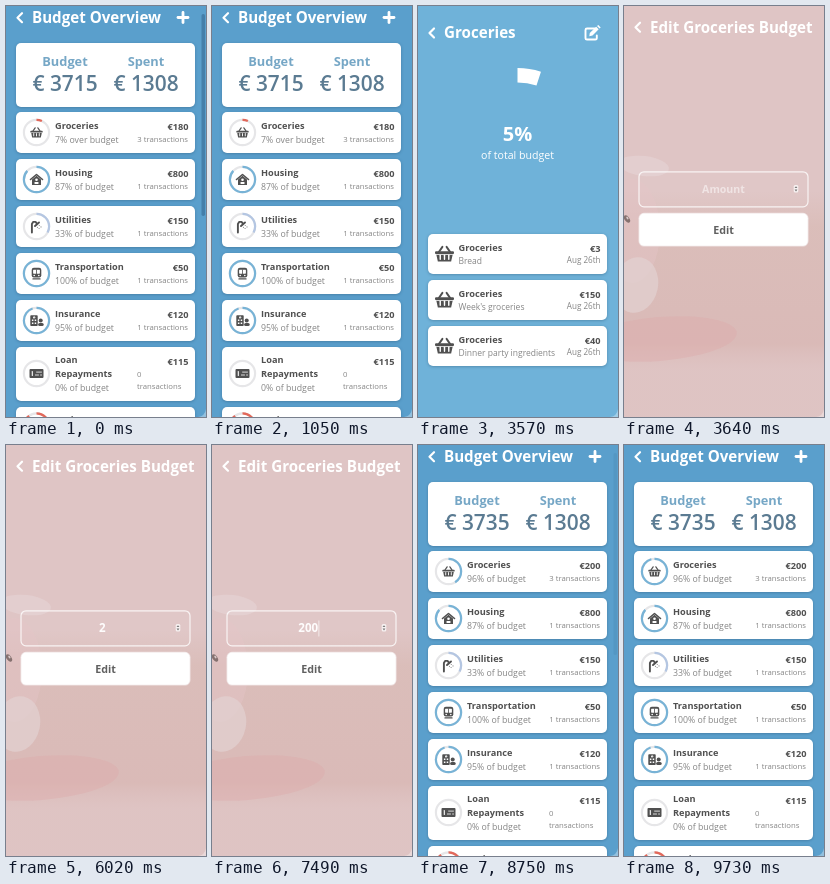
Recreate the animation shown at these times as an HTML page with a canvas. Size 200 px wide and 411 px high, loop 9.8 s.

```html
<!DOCTYPE html>
<html lang="en">
<head>
<meta charset="utf-8">
<title>Budget Overview</title>
<style>
  html, body { margin: 0; width: 100%; height: 100%; overflow: hidden; background: #5a9fcc; }
  canvas { display: block; width: 200px; height: 411px; }
</style>
</head>
<body>
<canvas id="stage"></canvas>
<script>
const W = 200, H = 411, LOOP = 9800;
const DARK = '#505050', GREY = '#858585', BLUE = '#78b3d6', RED = '#e2685a';
const FONT = '"Open Sans", "Noto Sans", sans-serif';

const canvas = document.getElementById('stage');
const ctx = canvas.getContext('2d');
const dpr = window.devicePixelRatio || 1;
canvas.width = W * dpr;
canvas.height = H * dpr;

// ---------- helpers ----------
function text(str, x, y, size, weight, color, align = 'left') {
  ctx.font = `${weight} ${size}px ${FONT}`;
  ctx.fillStyle = color;
  ctx.textAlign = align;
  ctx.fillText(str, x, y);
}

function box(x, y, w, h, r, fill) {
  ctx.beginPath();
  ctx.roundRect(x, y, w, h, r);
  ctx.fillStyle = fill;
  ctx.fill();
}

function line(points, width, color) {
  ctx.beginPath();
  points.forEach(([x, y]) => ctx.lineTo(x, y));
  ctx.lineWidth = width;
  ctx.strokeStyle = color;
  ctx.lineCap = ctx.lineJoin = 'round';
  ctx.stroke();
}

function shape(points, fill) {
  ctx.beginPath();
  points.forEach(([x, y]) => ctx.lineTo(x, y));
  ctx.closePath();
  ctx.fillStyle = fill;
  ctx.fill();
}

function oval(x, y, rx, ry, fill, turn = 0) {
  ctx.beginPath();
  ctx.ellipse(x, y, rx, ry, turn, 0, Math.PI * 2);
  ctx.fillStyle = fill;
  ctx.fill();
}

function arc(x, y, r, part, width, color) {
  if (part <= 0) return;
  ctx.beginPath();
  ctx.arc(x, y, r, -Math.PI / 2, (part * 2 - 0.5) * Math.PI);
  ctx.lineWidth = width;
  ctx.lineCap = 'butt';
  ctx.strokeStyle = color;
  ctx.stroke();
}

function card(y, h) {
  ctx.save();
  ctx.shadowColor = 'rgba(25, 60, 90, 0.35)';
  ctx.shadowBlur = 3 * dpr;
  ctx.shadowOffsetY = 0.8 * dpr;
  box(10, y, 179, h, 5, '#fff');
  ctx.restore();
}

function at(x, y, scale, draw) {
  ctx.save();
  ctx.translate(x, y);
  ctx.scale(scale, scale);
  draw();
  ctx.restore();
}

function header(title, y) {
  line([[16, y - 4.5], [11.5, y], [16, y + 4.5]], 2.2, '#fff');
  text(title, 26, y + 5.4, 15.15, 700, '#fff');
}

function corner() {
  ctx.beginPath();
  ctx.moveTo(W, H - 8);
  ctx.quadraticCurveTo(W - 1, H - 1, W - 8, H);
  ctx.lineTo(W, H);
  ctx.fillStyle = 'rgba(255, 255, 255, 0.35)';
  ctx.fill();
}

const clamp = p => Math.min(1, Math.max(0, p));
const ease = p => p * p * (3 - 2 * p);
const progress = (t, from, length) => clamp((t - from) / length);

// ---------- icons, centred on 0,0 ----------
function basket() {
  line([[-6, -2], [-2.2, -7.5]], 2, DARK);
  line([[6, -2], [2.2, -7.5]], 2, DARK);
  box(-10, -2.8, 20, 3, 1.2, DARK);
  shape([[-8.5, 1], [8.5, 1], [7, 8], [-7, 8]], DARK);
  for (const x of [-4.5, 0, 4.5]) line([[x, 1.4], [x, 5.5]], 1.5, '#fff');
}

function house() {
  line([[-6, 0], [0, -5], [6, 0]], 1.6, DARK);
  shape([[-4.5, 0], [0, -3.8], [4.5, 0], [4.5, 5.5], [-4.5, 5.5]], DARK);
  oval(0, 0.3, 1.3, 1.3, '#fff');
  box(-2.2, 2.4, 4.4, 2, 1, '#fff');
}

function shower() {
  line([[-4.6, 6], [-4.6, -2.6], [-3.4, -4.6], [-1, -4.6], [0, -3.5]], 1.9, DARK);
  line([[-1.5, -0.5], [2.5, -4]], 1.9, DARK);
  for (const [x, y] of [[1, 0.8], [2.8, -1], [2.6, 2], [4.5, 0.4]])
    oval(x, y, 0.6, 0.6, '#888');
}

function train() {
  box(-4.8, -5.8, 9.6, 9.8, 2.2, DARK);
  box(-3.4, -3.8, 6.8, 4, 0.6, '#fff');
  line([[0, -3.8], [0, 0.2]], 0.8, DARK);
  oval(-2.3, 2, 0.8, 0.8, '#fff');
  oval(2.3, 2, 0.8, 0.8, '#fff');
  line([[-3.6, 5.4], [3.6, 5.4]], 1.1, DARK);
}

function clinic() {
  box(-6.2, -5.3, 7.4, 10.8, 0.8, DARK);
  for (const y of [-1, 2]) for (const x of [-4.6, -1.8]) box(x, y, 1.5, 1.5, 0, '#fff');
  line([[-2.5, -4.1], [-2.5, -2.1]], 0.8, '#fff');
  line([[-3.5, -3.1], [-1.5, -3.1]], 0.8, '#fff');
  oval(4.2, 0, 2, 2, DARK);
  box(1.6, 2.5, 5.6, 3, 1.5, DARK);
}

function check() {
  box(-7, -4.5, 14, 9, 0.9, DARK);
  line([[-4.2, -2], [-4.2, 2]], 1.1, '#fff');
  line([[-1.2, 1.5], [2, 1.5]], 0.8, '#fff');
  line([[0, -1.4], [5, -1.4]], 0.8, '#fff');
  line([[4, 1.5], [5, 1.5]], 0.8, '#fff');
}

function pencil() {
  ctx.beginPath();
  ctx.moveTo(3, -4.5);
  ctx.lineTo(-5.5, -4.5);
  ctx.quadraticCurveTo(-7, -4.5, -7, -3);
  ctx.lineTo(-7, 5.2);
  ctx.quadraticCurveTo(-7, 6.5, -5.5, 6.5);
  ctx.lineTo(2.8, 6.5);
  ctx.quadraticCurveTo(4.3, 6.5, 4.3, 5.2);
  ctx.lineTo(4.3, 2.5);
  ctx.lineWidth = 1.9;
  ctx.strokeStyle = '#fff';
  ctx.stroke();
  shape([[-3.2, 3.2], [-2.7, 0], [3.7, -6.2], [6.2, -3.7], [0, 2.6]], '#fff');
  shape([[4.5, -7], [5.8, -8], [8.2, -5.6], [7.1, -4.5]], '#fff');
}

// ---------- screens ----------
const items = [
  ['Housing', '87% of budget', '€800', 0.87, BLUE, house],
  ['Utilities', '33% of budget', '€150', 0.33, '#b4c6e2', shower],
  ['Transportation', '100% of budget', '€50', 1, BLUE, train],
  ['Insurance', '95% of budget', '€120', 0.95, BLUE, clinic]
];

function ring(y, part, color, icon, scale = 1) {
  arc(30.5, y, 12.6, 1, 2.2, '#e6e6e8');
  arc(30.5, y, 12.6, part, 2.2, color);
  if (icon) at(30.5, y, scale, icon);
}

function item(y, [name, sub, price, part, color, icon, scale], count = 1) {
  card(y, 41);
  ring(y + 20.5, part, color, icon, scale);
  text(name, 49, y + 17.1, 9.2, 700, DARK);
  text(sub, 49, y + 30.8, 8.75, 400, GREY);
  text(price, 182.5, y + 18.3, 9.2, 700, DARK, 'right');
  text(count + ' transactions', 182, y + 30.1, 7.75, 400, GREY, 'right');
}

function overview(saved, grow, bar) {
  ctx.fillStyle = '#5a9fcc';
  ctx.fillRect(0, 0, W, H);
  header('Budget Overview', 11.7);
  line([[177, 6.5], [177, 16.5]], 2.8, '#fff');
  line([[172, 11.5], [182, 11.5]], 2.8, '#fff');

  card(37, 64);
  text('Budget', 59, 59.7, 12.8, 700, '#76a7c6', 'center');
  text('Spent', 140, 59.7, 12.8, 700, '#76a7c6', 'center');
  text(saved ? '€ 3735' : '€ 3715', 59, 85.2, 20.9, 600, '#5b7b92', 'center');
  text('€ 1308', 140, 85.2, 20.9, 600, '#5b7b92', 'center');

  const food = saved
    ? ['Groceries', '96% of budget', '€200', 0.07 + 0.89 * grow, BLUE, basket, 0.62]
    : ['Groceries', '7% over budget', '€180', 0.07, RED, basket, 0.62];
  item(106, food, 3);
  items.forEach((it, i) => item(153 + 47 * i, it));

  card(341, 54);
  ring(367.5, 0, BLUE, check);
  text('Loan', 49, 357.4, 9.2, 700, DARK);
  text('Repayments', 49, 371.4, 9.2, 700, DARK);
  text('0% of budget', 49, 384.8, 8.75, 400, GREY);
  text('€115', 182.5, 359.4, 9.2, 700, DARK, 'right');
  text('0', 131, 371, 7.75, 400, GREY);
  text('transactions', 131, 382.6, 7.75, 400, GREY);

  card(401, 41);
  ring(420, 0.9, RED);
  text('Savings', 49, 417.3, 9.2, 700, DARK);

  box(195.5, 8, 3.5, 202, 1.75, `rgba(45, 95, 135, ${0.5 * bar})`);
  corner();
}

function groceries() {
  ctx.fillStyle = '#6fb2d9';
  ctx.fillRect(0, 0, W, H);
  header('Groceries', 27);
  at(174.5, 27, 1, pencil);
  arc(99.5, 138, 68.7, 0.05, 14.5, '#fff');
  text('5%', 99.5, 134.5, 20, 700, '#fff', 'center');
  text('of total budget', 99.5, 153, 10.6, 400, '#fff', 'center');

  [['Bread', '€3'], ["Week's groceries", '€150'], ['Dinner party ingredients', '€40']]
    .forEach(([note, price], i) => {
      const y = 228 + 46 * i;
      card(y, 40);
      at(26.5, y + 20, 0.95, basket);
      text('Groceries', 40.5, y + 17, 9.25, 700, DARK);
      text(note, 40.5, y + 30.3, 8.5, 400, GREY);
      text(price, 182.5, y + 17.5, 9.2, 700, DARK, 'right');
      text('Aug 26th', 182.5, y + 29, 8.1, 400, GREY, 'right');
    });
  corner();
}

function backdrop() {
  ctx.fillStyle = '#dfc5c5';
  ctx.fillRect(0, 0, W, H);
  const wall = ctx.createLinearGradient(0, 185, 0, 365);
  wall.addColorStop(0, 'rgba(217, 187, 182, 0)');
  wall.addColorStop(0.2, 'rgba(217, 187, 182, 0.75)');
  wall.addColorStop(0.85, 'rgba(217, 184, 181, 0.85)');
  wall.addColorStop(1, 'rgba(221, 192, 190, 0.25)');
  ctx.fillStyle = wall;
  ctx.fillRect(0, 185, W, H - 185);
  oval(35, 333, 78, 22, 'rgba(220, 172, 172, 0.45)', -0.08);
  oval(8, 225, 28, 52, 'rgba(227, 196, 197, 0.5)');
  oval(20, 160, 25, 10, 'rgba(229, 211, 212, 0.7)', 0.12);
  oval(12, 279, 22, 28, 'rgba(226, 208, 208, 0.75)', 0.2);
  oval(3, 213, 2.4, 4.2, '#85716f', -0.6);
  oval(3.4, 212, 0.9, 1.5, '#d8c8c8', -0.6);
}

function edit(value, caret) {
  backdrop();
  header('Edit Groceries Budget', 21.2);

  box(15, 165.8, 169, 35, 5, 'rgba(255, 255, 255, 0.04)');
  ctx.lineWidth = 1.2;
  ctx.strokeStyle = 'rgba(255, 255, 255, 0.8)';
  ctx.stroke();
  if (value) text(value, 96.3, 187.3, 11.6, 700, 'rgba(255, 255, 255, 0.95)', 'center');
  else text('Amount', 99.5, 187, 10.6, 700, 'rgba(255, 255, 255, 0.52)', 'center');
  if (caret) {
    const half = value ? ctx.measureText(value).width / 2 + 0.2 : 0;
    ctx.fillStyle = 'rgba(255, 255, 255, 0.7)';
    ctx.fillRect(96.3 + half, 175.5, 0.9, 16);
  }

  box(169.7, 179, 4.6, 7.5, 1.5, '#f7f1f1');
  shape([[170.6, 182.1], [172, 180.2], [173.4, 182.1]], '#777');
  shape([[170.6, 183.5], [172, 185.4], [173.4, 183.5]], '#777');

  box(14.5, 206.8, 170, 33.7, 5.5, '#efe4e4');
  box(15.3, 207.6, 168.4, 32.1, 4.7, '#fff');
  text('Edit', 99.5, 227.8, 10.7, 700, '#606060', 'center');
  corner();
}

// ---------- timeline ----------
const OPEN = 1120, EDIT = 3640, BACK = 7560, SAVED = 8540, FADE = 280;
const carets = [[4830, 5390], [6090, 7210], [7490, 7560]];

function draw(t) {
  ctx.setTransform(dpr, 0, 0, dpr, 0, 0);
  if (t < OPEN) overview(false, 0, 1 - progress(t, 280, FADE));
  else if (t < EDIT) groceries();
  else if (t < BACK) {
    const typed = [6020, 6370, 6510].filter(k => t >= k).length;
    edit('200'.slice(0, typed), carets.some(([a, b]) => t >= a && t < b));
  } else overview(t >= SAVED, ease(progress(t, SAVED, 500)), 1 - progress(t, SAVED, FADE));
}

const start = performance.now();
function tick() {
  draw((performance.now() - start) % LOOP);
  requestAnimationFrame(tick);
}
tick();
</script>
</body>
</html>
```
